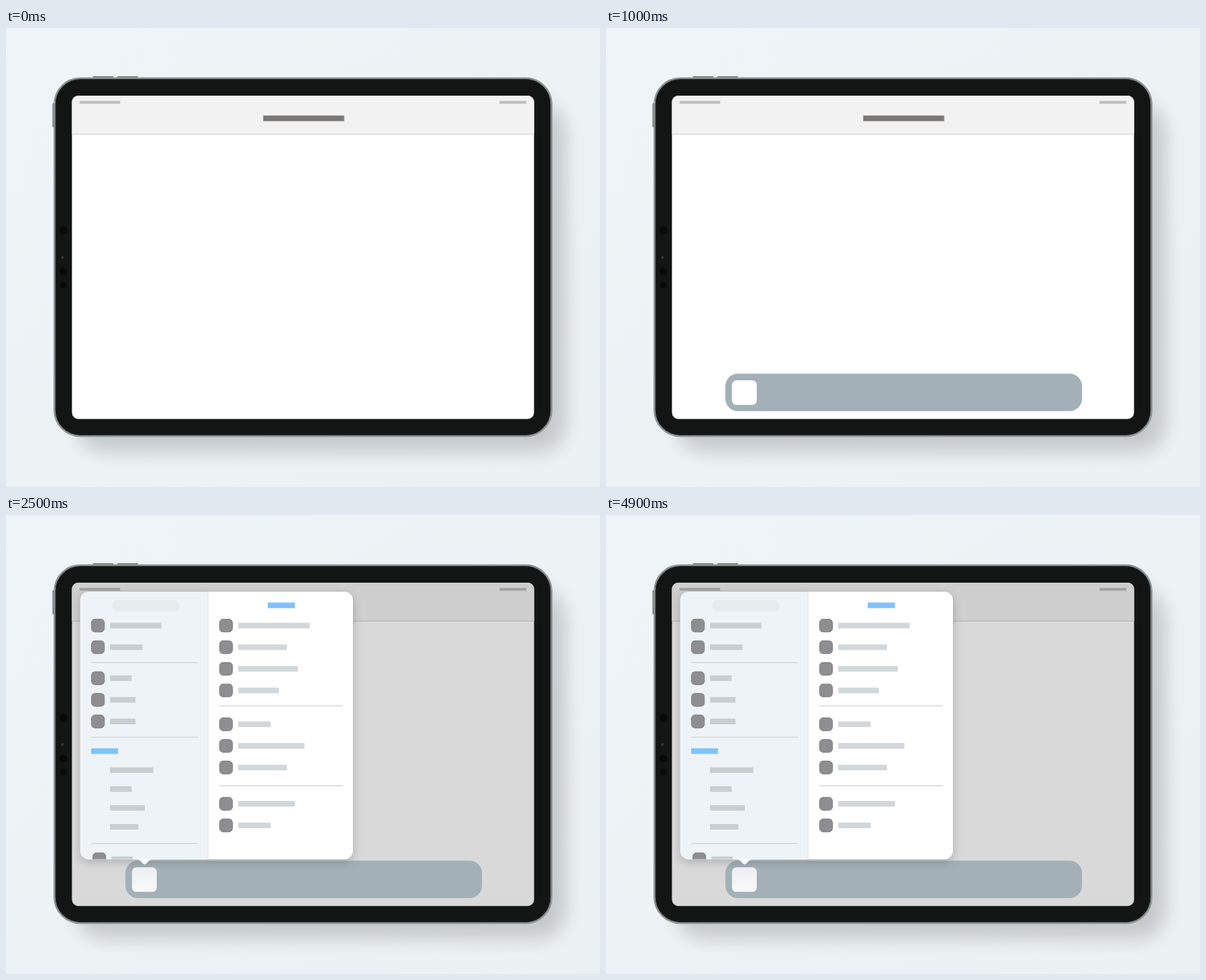
Recreate the animation shown at these times as an HTML page. Size 851 by 658 pixels, loop 5 s.

```html
<!DOCTYPE html>
<html lang="en">
<head>
<meta charset="utf-8">
<title>Tablet dock</title>
<style>
  html, body { margin: 0; width: 100%; height: 100%; overflow: hidden; background: #edf2f5; }
  svg { display: block; width: 100%; height: 100%; }
</style>
</head>
<body>
<svg viewBox="0 0 851 658">
  <defs>
    <linearGradient id="page" x1="0" y1="0" x2="1" y2="1">
      <stop offset="0" stop-color="#eef4f7"/>
      <stop offset="1" stop-color="#ebf0f3"/>
    </linearGradient>
    <linearGradient id="pressed" x1="0" y1="0" x2="0" y2="1">
      <stop offset="0" stop-color="#eceff2"/>
      <stop offset="1" stop-color="#f8f9fa"/>
    </linearGradient>
    <filter id="soft" x="-20%" y="-20%" width="140%" height="140%">
      <feGaussianBlur stdDeviation="13"/>
    </filter>
    <filter id="lift" x="-20%" y="-20%" width="140%" height="140%">
      <feGaussianBlur stdDeviation="7"/>
    </filter>
    <clipPath id="screen"><rect x="94.5" y="97" width="662" height="463.5" rx="9"/></clipPath>
    <clipPath id="card"><rect x="106.5" y="110" width="390.5" height="383.5" rx="12"/></clipPath>
  </defs>

  <rect width="851" height="658" fill="url(#page)"/>
  <rect x="100" y="108" width="702" height="500" rx="40" opacity=".16" filter="url(#soft)"/>

  <!-- tablet body -->
  <g fill="#7f8686">
    <rect x="124.5" y="69" width="29.5" height="4" rx="1"/>
    <rect x="159.5" y="69" width="29.5" height="4" rx="1"/>
    <rect x="66.5" y="108" width="4" height="34.5" rx="1"/>
  </g>
  <rect x="69.5" y="72" width="712" height="513" rx="37" fill="#131414" stroke="#8b9292" stroke-width="2.6"/>
  <rect x="71.3" y="73.8" width="708.4" height="509.4" rx="35.2" fill="none" stroke="#2b2e2e"/>
  <g fill="#090909">
    <circle cx="82" cy="290" r="5.5"/>
    <circle cx="82" cy="349" r="5.3"/>
    <circle cx="82" cy="368.5" r="4.5"/>
  </g>
  <circle cx="81" cy="329" r="1.4" fill="#292a2b" stroke="#555" stroke-width=".6"/>

  <g clip-path="url(#screen)">
    <rect x="94" y="97" width="663" height="464" fill="#fff"/>
    <rect x="94" y="97" width="663" height="55" fill="#f2f2f2"/>
    <rect x="94" y="151.5" width="663" height="1.2" fill="#d4d5d5"/>
    <rect x="105.5" y="104.5" width="58" height="4" fill="#bdbdbd"/>
    <rect x="707" y="104.5" width="38.5" height="4" fill="#bdbdbd"/>
    <rect x="368.5" y="125.5" width="116" height="8" fill="#7a7877"/>
    <rect id="dim" x="94" y="97" width="663" height="464" opacity=".15"/>
    <g id="dock">
      <rect x="171" y="495.5" width="511" height="53.8" rx="18" fill="#a4b0b8"/>
      <rect id="app" x="180.5" y="505" width="35.5" height="35.3" rx="6.5" fill="#fff"/>
    </g>
    <g id="menu">
      <rect x="106.5" y="114" width="390.5" height="383.5" rx="12" opacity=".2" filter="url(#lift)"/>
      <rect x="180.5" y="505" width="35.5" height="35.3" rx="6.5" fill="url(#pressed)"/>
      <path d="M187 493 Q190 493.5 192 495.5 L196 499.6 Q198.5 502 201 499.6 L205 495.5 Q207 493.5 210 493Z" fill="#f8fafb"/>
      <g clip-path="url(#card)" id="rows">
        <rect x="106" y="110" width="392" height="384" fill="#fff"/>
        <rect x="106" y="110" width="183.5" height="384" fill="#edf3f6"/>
        <rect x="289" y="110" width="1" height="384" fill="#e1e5e7"/>
        <rect x="152" y="122" width="96.5" height="15.5" rx="7" fill="#e7ebed"/>
      </g>
    </g>
  </g>

  <g id="touch">
    <circle cx="425.5" cy="470" r="66.5" fill="#3c64eb" fill-opacity=".13"/>
    <circle cx="425.5" cy="470" r="33" fill="#fff" stroke="#0a8dfb" stroke-width="9"/>
  </g>
</svg>
<script>
  const LOOP = 5000, STEP = 100;
  const el = id => document.getElementById(id);
  const [dim, dock, app, menu, rows, touch] =
    ["dim", "dock", "app", "menu", "rows", "touch"].map(el);

  function box(x, y, width, height, fill, extra = {}) {
    const r = document.createElementNS("http://www.w3.org/2000/svg", "rect");
    const attrs = { x, y, width, height, fill, ...extra };
    for (const key in attrs) r.setAttribute(key, attrs[key]);
    rows.append(r);
  }
  const bar = (x, y, w, fill) => box(x, y - 4, w, 8, fill);
  const line = (x, y, w) => box(x, y - 0.8, w, 1.6, "#d5d9db");
  const icon = (x, y) => box(x + 0.5, y - 9.2, 18.4, 18.4, "#8e8e90",
    { rx: 5, stroke: "#7c7c7e", "stroke-width": 1 });

  function list(x, gap, fill, items) {
    for (const [y, w] of items) {
      icon(x, y);
      bar(x + gap, y, w, fill);
    }
  }

  const GREY = "#c9ced1", PALE = "#d1d7da", BLUE = "#7dc3fb";
  list(122, 27, GREY, [[158.5, 73.5], [189.5, 46.5], [234, 31], [265, 36.5], [296, 36.5]]);
  [211.5, 318.5, 471].forEach(y => line(122, y, 153));
  bar(122, 338.5, 38.5, BLUE);
  [62, 31, 50, 40.5].forEach((w, i) => bar(149, 365.7 + i * 27.1, w, GREY));
  list(124, 27, GREY, [[493.5, 31]]);

  bar(375, 129.5, 39, BLUE);
  list(305.5, 27, PALE, [
    [158.5, 102.5], [189.5, 70], [220.5, 85.5], [251.5, 58.5],
    [300, 46.5], [331, 95], [362, 70], [414, 81.5], [445, 46.5]
  ]);
  [273.5, 388].forEach(y => line(305.5, y, 176.5));

  const clamp = v => Math.max(0, Math.min(1, v));
  const span = (t, a, b) => clamp((t - a) / (b - a));
  const ease = p => p * p * (3 - 2 * p);
  const show = (node, on) => node.setAttribute("visibility", on ? "visible" : "hidden");
  const shift = (node, y) => node.setAttribute("transform", `translate(0 ${y})`);

  function draw(time) {
    const t = Math.floor((time % LOOP) / STEP) * STEP;
    const rise = ease(span(t, 0, 200));
    const settle = ease(span(t, 300, 600));
    const open = t >= 1700;

    // the dock follows the finger up, then drops to rest
    shift(dock, 80 - 95.3 * rise + 15.3 * settle);
    shift(touch, 95.3 * (1 - rise));
    touch.setAttribute("opacity", 1 - span(t, 200, 500));
    show(dock, t > 0);
    show(touch, t > 0 && t < 500);
    show(dim, open);
    show(menu, open);
    show(app, t > 0 && !open);
  }

  const start = performance.now();
  function tick() {
    draw(performance.now() - start);
    requestAnimationFrame(tick);
  }
  tick();
</script>
</body>
</html>
```
